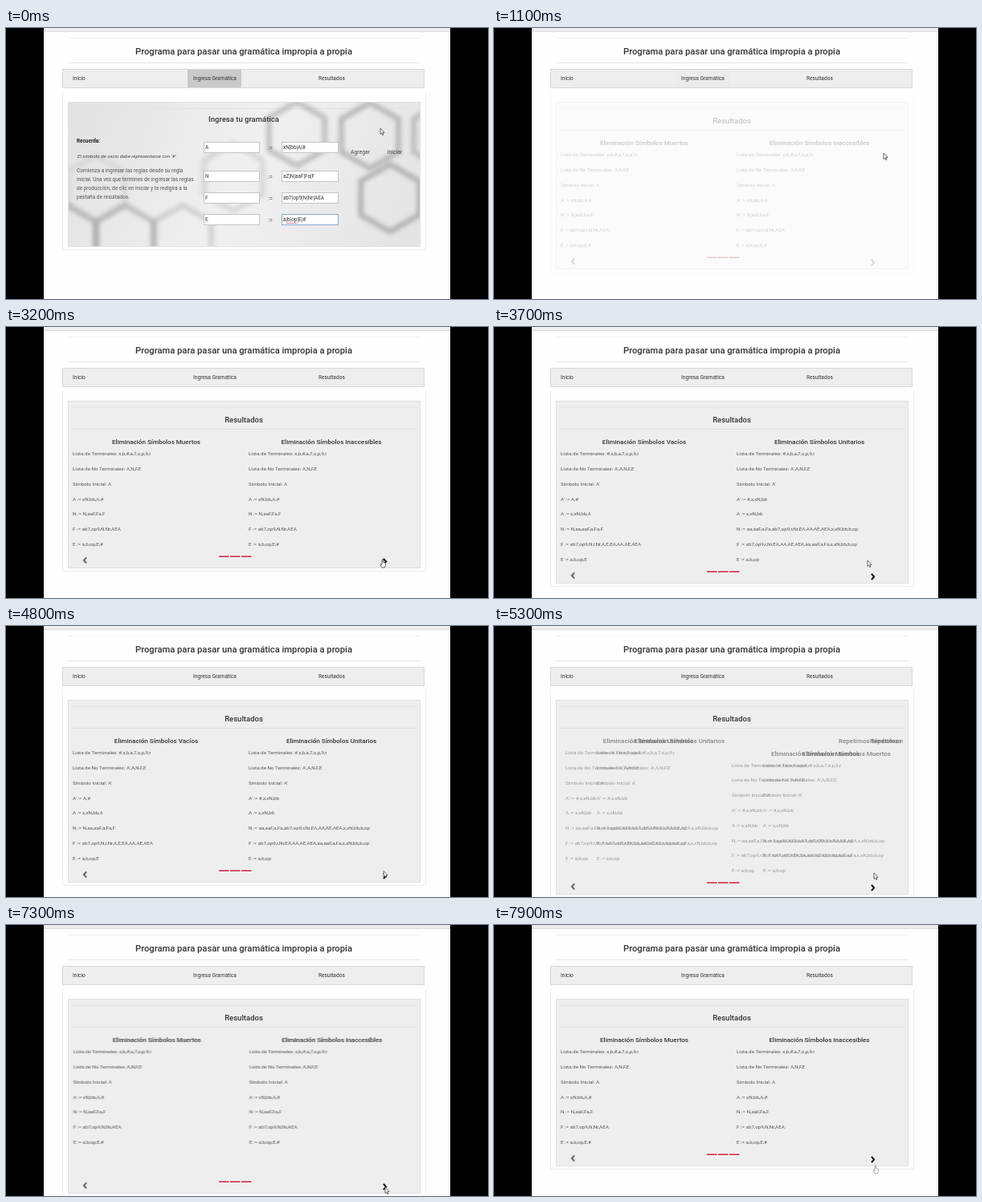
Recreate the animation shown at these times as an HTML page with a canvas. Size 600 px wide and 338 px high, loop 8000 ms.

```html
<!DOCTYPE html>
<html lang="es">
<head>
<meta charset="utf-8">
<style>
  html, body { margin: 0; width: 100%; height: 100%; overflow: hidden; background: #000; }
  canvas { display: block; width: 600px; height: 338px; }
</style>
</head>
<body>
<canvas id="stage" width="600" height="338"></canvas>
<script>
const ctx = document.getElementById('stage').getContext('2d');
const LOOP = 8000, SLIDE_TIME = 300, SLIDE_WIDTH = 426;
const FORM_END = 1000, FADE_TIME = 400;

const longN = "N := aa,aaF,a,Fa,ab7,op9,r,Nr,EA,AA,AE,AEA,x,xN,bb,b,op";
const longF = "F := ab7,op9,r,Nr,EA,AA,AE,AEA,aa,aaF,a,Fa,x,xN,bb,b,op";
const rows = (terminals, others, start, ...rules) => [
  'Lista de Terminales: ' + terminals,
  'Lista de No Terminales: ' + others,
  'Símbolo Inicial: ' + start, ...rules];

const firstRows = rows('x,b,#,a,7,o,p,9,r', 'A,N,F,E', 'A',
  'A := xN,bb,A,#', 'N := N,aaF,Fa,F', 'F := ab7,op9,N,Nr,AEA', 'E := a,b,op,E,#');
const signs = '#,x,b,a,7,o,p,9,r';
const unitRows = rows(signs, "A',A,N,F,E", "A'",
  "A' := #,x,xN,bb", 'A := x,xN,bb', longN, longF, 'E := a,b,op');

const slides = [
  { bottom: 301, heads: ['Muertos', 'Inaccesibles'], columns: [firstRows, firstRows] },
  { bottom: 320, heads: ['Vacíos', 'Unitarios'], columns: [
    rows(signs, "A',A,N,F,E", "A'", "A' := A,#", 'A := x,xN,bb,A', 'N := N,aa,aaF,a,Fa,F',
      'F := ab7,op9,N,r,Nr,A,E,EA,AA,AE,AEA', 'E := a,b,op,E'),
    unitRows] },
  { bottom: 335, heads: ['Muertos', 'Inaccesibles'], columns: [unitRows,
    rows(signs, "A',N,F,E,A", "A'", "A' := #,x,xN,bb", longN, longF, 'E := a,b,op', 'A := x,xN,bb')],
    title: 'Repetimos Símbolos muertos e inaccesibles' }
];
const changes = [[3390, 0, 1], [5213, 1, 2], [7010, 2, 0]];

// time, x, y, shape taken on from that time
const pointerPath = [
  [0, 466, 125, 'arrow'], [250, 466, 125, 'arrow'], [850, 485, 156, 'arrow'],
  [1900, 485, 156, 'arrow'], [2700, 471, 287, 'arrow'], [2800, 469, 290, 'hand'],
  [3200, 468, 290, 'hand'], [3450, 468, 290, 'arrow'], [3700, 465, 291, 'arrow'],
  [4500, 465, 291, 'arrow'], [4900, 471, 308, 'hand'], [5200, 473, 308, 'arrow'],
  [5300, 473, 308, 'arrow'], [5900, 472, 327, 'hand'], [7300, 472, 327, 'arrow'],
  [7800, 472, 327, 'arrow'], [7880, 474, 300, 'hand'], [LOOP, 474, 300, 'hand']
];

const clamp = v => Math.max(0, Math.min(1, v));

// The CSS "ease" curve, solved by bisection.
function ease(x) {
  x = clamp(x);
  const bezier = (s, a, b) => 3 * (1 - s) ** 2 * s * a + 3 * (1 - s) * s * s * b + s ** 3;
  let lo = 0, hi = 1;
  for (let i = 0; i < 20; i++) {
    const mid = (lo + hi) / 2;
    if (bezier(mid, .25, .25) < x) lo = mid; else hi = mid;
  }
  return bezier(lo, .1, 1);
}

function text(str, x, y, size, { color = '#555', style = '', align = 'left' } = {}) {
  ctx.font = `${style} ${size}px Roboto, "Noto Sans", sans-serif`;
  ctx.fillStyle = color;
  ctx.textAlign = align;
  ctx.fillText(str, x, y + size * .34);
}

function box(x, y, w, h, fill, stroke) {
  ctx.fillStyle = fill;
  ctx.fillRect(x, y, w, h);
  if (!stroke) return;
  ctx.strokeStyle = stroke;
  ctx.lineWidth = 1;
  ctx.strokeRect(x + .5, y + .5, w - 1, h - 1);
}

function path(points, close) {
  ctx.beginPath();
  points.forEach(([x, y]) => ctx.lineTo(x, y));
  if (close) ctx.closePath();
}

function withAlpha(alpha, draw) {
  ctx.save();
  ctx.globalAlpha *= alpha;
  draw();
  ctx.restore();
}

const heading = { style: '500', color: '#333', align: 'center' };

function drawPage(highlight) {
  box(0, 0, 600, 338, '#000');
  box(47, 0, 506, 338, '#fefefe');
  box(47, 0, 506, 5, '#eee');
  box(47, 4, 506, 1, '#dcdcdc');
  box(78, 12, 437, 1, '#f0f0f0');
  text('Programa para pasar una gramática impropia a propia', 296, 28.7, 11.2, heading);
  box(78, 43, 437, 1, '#e6e6e6');
  box(70, 51, 451, 24, '#eee', '#d8d8d8');
  withAlpha(highlight, () => box(226, 52, 67, 22, '#c9c9c9'));
  text('Inicio', 83, 63, 6.6, { color: '#333' });
  text('Ingresa Gramática', 233, 63, 6.6, { color: '#333' });
  text('Resultados', 389, 63, 6.6, { color: '#333' });
}

function drawPanel(bottom, fill) {
  path([[70.5, 80], [70.5, bottom + 3.5], [522.5, bottom + 3.5], [522.5, 80]]);
  ctx.strokeStyle = '#ececec';
  ctx.lineWidth = 1;
  ctx.stroke();
  box(77, 92, 439, bottom - 92, fill, '#e0e0e0');
  box(82, 100, 430, 1, '#e3e3e3');
}

function drawHexagons() {
  ctx.save();
  ctx.beginPath();
  ctx.rect(78, 93, 437, 179);
  ctx.clip();
  ctx.filter = 'blur(2.5px)';
  const hexagons = [[362, 132, 40, .8], [453, 134, 41, .9], [478, 212, 42, 1], [543, 134, 41, .8],
    [283, 186, 42, .4], [76, 262, 41, .8], [148, 262, 41, .8], [220, 262, 41, .5], [112, 200, 41, .25]];
  for (const [cx, cy, r, strength] of hexagons) {
    path([...Array(6).keys()].map(i =>
      [cx + r * Math.sin(i * Math.PI / 3), cy - r * Math.cos(i * Math.PI / 3)]), true);
    ctx.strokeStyle = `rgba(165,165,165,${strength * .75})`;
    ctx.lineWidth = 7;
    ctx.stroke();
  }
  ctx.restore();
}

function drawForm(t) {
  const shade = ctx.createLinearGradient(77, 92, 516, 273);
  shade.addColorStop(0, '#e2e2e2');
  shade.addColorStop(.5, '#f0f0f0');
  shade.addColorStop(1, '#e3e3e3');
  drawPanel(273, shade);
  drawHexagons();
  text('Ingresa tu gramática', 296, 114, 9.5, heading);
  text('Recuerda:', 88, 141, 6.4, { style: '700', color: '#222' });
  text("El símbolo de vacío debe representarse con '#'", 89, 160, 6.15, { style: 'italic', color: '#444' });
  ['Comienza a ingresar las reglas desde su regla',
    'inicial. Una vez que termines de ingresar las reglas',
    'de producción, de clic en iniciar y te redigirá a la',
    'pestaña de resultados.'].forEach((line, i) => text(line, 88, 178 + i * 11, 6.5));

  const focused = t < 850;
  [['A', 'xN|bb|A|#', 149], ['N', 'aZ|N|aaF|Fa|F', 185],
    ['F', 'ab7|op9|N|Nr|AEA', 212], ['E', 'a|b|op|E|#', 239]].forEach(([name, rule, y], i) => {
    box(246, y - 7, 70, 14, '#fff', '#c4c4c4');
    box(343, y - 7, 71, 14, '#fff', focused && i === 3 ? '#85a9cc' : '#c4c4c4');
    text(name, 248, y, 6.4, { color: '#333' });
    text(':=', 329, y, 7.5, { color: '#444', align: 'center' });
    text(rule, 345, y, 6.4, { color: '#333' });
  });
  if (focused) box(349, 243, 13, 1, '#e58b8b');
  text('Agregar', 441, 155, 6.8, { color: '#444', align: 'center' });
  text('Iniciar', 484, 155, 6.8, { color: '#444', align: 'center' });
}

function drawSlide({ heads, columns, title }, shift) {
  const drop = title ? 15.5 : 0;
  if (title) text(title, 296 + shift, 143.5, 8.05, heading);
  columns.forEach((lines, i) => {
    text('Eliminación Símbolos ' + heads[i], 187 + i * 218 + shift, 143.5 + drop, 8.05, heading);
    lines.forEach((line, j) => text(line, 83 + i * 219 + shift, 158 + drop + j * 18.8, 6.25));
  });
}

function chevron(x, y, dir, color) {
  path([[x - 1.6 * dir, y - 3.6], [x + 1.6 * dir, y], [x - 1.6 * dir, y + 3.6]]);
  ctx.strokeStyle = color;
  ctx.lineWidth = 2;
  ctx.stroke();
}

function drawResults(t) {
  const [start, from, to] = changes.findLast(c => t >= c[0]) || [-LOOP, 0, 0];
  const moving = t < start + SLIDE_TIME;
  const bottom = moving ? Math.max(slides[from].bottom, slides[to].bottom) : slides[to].bottom;
  drawPanel(bottom, '#eee');
  text('Resultados', 296, 116, 9.5, heading);
  box(82, 127, 430, 1, '#dfdfdf');

  ctx.save();
  ctx.beginPath();
  ctx.rect(82, 130, 427, 206);
  ctx.clip();
  if (moving) {
    // Two half-strength exposures per picture while sliding.
    for (const lag of [13, 0]) withAlpha(.55, () => {
      const offset = ease((t - lag - start) / SLIDE_TIME) * SLIDE_WIDTH;
      drawSlide(slides[from], -offset);
      drawSlide(slides[to], SLIDE_WIDTH - offset);
    });
  } else drawSlide(slides[to], 0);
  ctx.restore();

  for (let i = 0; i < 3; i++) box(265 + i * 14, bottom - 15.5, 12.5, 1.5, '#d4213f');
  chevron(98.5, bottom - 10, -1, '#666');
  chevron(471.5, bottom - 8.5, 1, t < 2750 ? '#666' : '#111');
}

function drawPointer(t) {
  const next = pointerPath.findIndex(p => p[0] > t);
  const [t0, x0, y0, shape] = pointerPath[next - 1], [t1, x1, y1] = pointerPath[next];
  const k = (t - t0) / (t1 - t0), glide = k * k * (3 - 2 * k);
  ctx.save();
  ctx.translate(x0 + (x1 - x0) * glide, y0 + (y1 - y0) * glide);
  path(shape === 'arrow'
    ? [[0, 0], [0, 7.5], [1.6, 6], [2.8, 8.6], [3.9, 8.1], [2.8, 5.6], [5, 5.4]]
    : [[0, 0], [1.3, 0], [1.6, 3.4], [4.6, 4.4], [4.4, 7.5], [3.4, 10], [0, 10], [-2.4, 6.3], [-1.6, 5.6], [0, 6.5]], true);
  ctx.fillStyle = '#fff';
  ctx.fill();
  ctx.strokeStyle = t > 7880 ? '#999' : '#555';
  ctx.lineWidth = .9;
  ctx.stroke();
  ctx.restore();
}

function frame(now) {
  const t = now % LOOP;
  const fade = clamp((t - FORM_END) / FADE_TIME);
  drawPage(t < FORM_END ? 1 : .12 * clamp(1 - (t - FORM_END) / 300));
  if (t < FORM_END) drawForm(t);
  else withAlpha(fade, () => drawResults(t));
  drawPointer(t);
  requestAnimationFrame(() => frame(performance.now()));
}
frame(performance.now());
</script>
</body>
</html>
```
